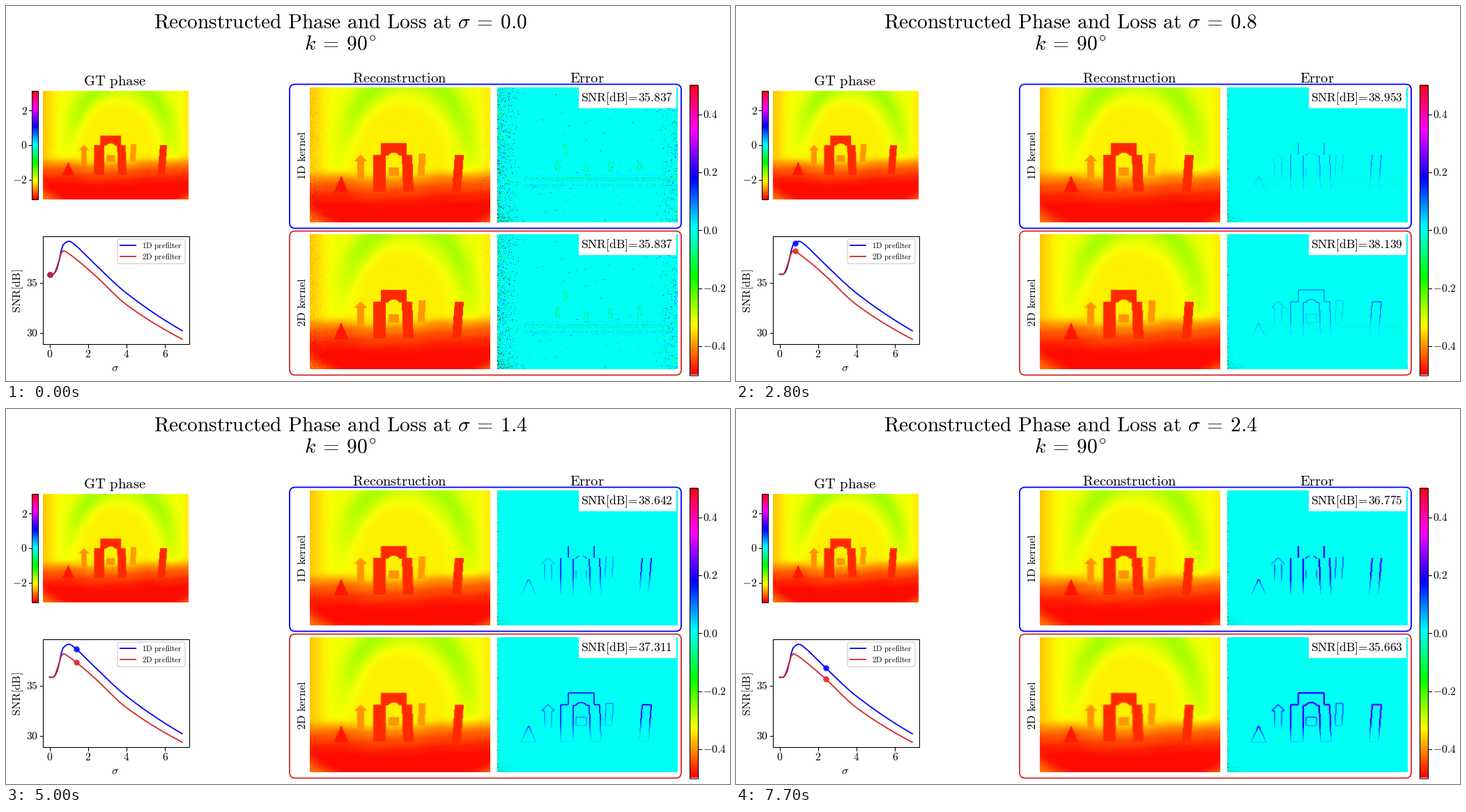
Recreate the animation shown at these times as a matplotlib script. Size 1039 px wide and 539 px high, loop 8000 ms.

```python
import numpy as np
import matplotlib.pyplot as plt
from matplotlib.animation import FuncAnimation
from matplotlib.patches import FancyBboxPatch, Rectangle

plt.rcParams["mathtext.fontset"] = "cm"
PT = 0.72  # points per pixel at 100 dpi

fig = plt.figure(figsize=(10.39, 5.39), dpi=100, facecolor="white")
ax = fig.add_axes([0, 0, 1, 1])
ax.set_xlim(0, 1039)
ax.set_ylim(539, 0)
ax.axis("off")


# ---------- drawing helpers, all in stage pixels ----------
def rm(words):
    return r"\mathrm{%s}" % words.replace(" ", r"\hspace{0.38}")


EQUALS = r"\hspace{0.22}=\hspace{0.22}"


def label(x, y, tex, size, ha="center", **kw):
    return ax.text(x, y, f"${tex}$", fontsize=size * PT, ha=ha, va="baseline",
                   rotation_mode="anchor", **kw)


def image(data, x, y, w, h, **kw):
    return ax.imshow(data, extent=(x, x + w, y + h, y), cmap="hsv",
                     aspect="auto", **kw)


def outline(x, y, w, h):
    ax.add_patch(Rectangle((x, y), w, h, fill=False, ec="black",
                           lw=1.1 * PT, zorder=4))


def rounded(x, y, w, h, radius, **kw):
    style = f"round,pad=0,rounding_size={radius}"
    return ax.add_patch(FancyBboxPatch((x, y), w, h, boxstyle=style, **kw))


def tick(x0, y0, x1, y1):
    ax.plot([x0, x1], [y0, y1], color="black", lw=1.1 * PT)


# ---------- phase scene, as a hue fraction between 0 and 1 ----------
H, W = 194, 259
Y, X = np.mgrid[:H, :W] + 0.5
u, v = X / W, Y / H


def ramp(x, a, b):
    s = np.clip((x - a) / (b - a), 0, 1)
    return s * s * (3 - 2 * s)


def bump(d):
    return np.exp(-d ** 2)


def blur(a, sigma, axis):
    k = np.arange(-4, 5)
    weights = np.exp(-0.5 * (k / sigma) ** 2)
    weights /= weights.sum()
    n = a.shape[axis]
    return sum(wt * a.take(np.clip(np.arange(n) + s, 0, n - 1), axis=axis)
               for s, wt in zip(k, weights))


def blur2(a, sigma):
    return blur(blur(a, sigma, 0), sigma, 1)


def slab(cx, top, width, height, lean=0):
    drop = (Y - top) / height
    return (np.abs(X - cx - lean * drop) < width / 2) & (0 < drop) & (drop < 1)


def wedge(cx, top, height, spread):
    drop = Y - top
    return (np.abs(X - cx) < spread * drop) & (drop < height)


bowl = np.hypot((u - 0.53) / 0.5, (v - 0.75) / 0.3)
corners = ramp(bowl, 1.03, 1.35) * ramp(v, 0.7, 0.85)


def make_scene():
    dome = np.hypot((u - 0.47) * 1.33, v - 0.5)
    arc = np.hypot((u - 0.54) / 0.35, (v - 0.62) / 0.72)
    wall = 0.161 + 0.018 * ramp(dome, 0.3, 0.5)
    wall += 0.05 * bump((arc - 1) / 0.17) * ramp(v, 0.78, 0.05)
    wall -= 0.05 * ramp(u, 0.15, -0.03) + 0.02 * ramp(u, 0.92, 1)

    horizon = 0.61 + 0.035 * bump((u - 0.42) / 0.22) + 0.005 * np.sin(24 * u)
    depth = v - horizon
    floor = 0.010 + 0.12 * np.clip(1 - depth / 0.26, 0, 1) ** 1.5
    floor += 0.003 * np.sin(75 * v + 9 * u) * ramp(v, 1, 0.7)
    near = ramp(depth, -0.05, 0.07)
    scene = wall * (1 - near) + floor * near + 0.07 * corners

    backdrop = scene.copy()

    def paint(hue, mask):
        scene[mask] = np.minimum(hue, backdrop[mask])

    paint(0.100, wedge(73, 96, 10, 0.95) | slab(73, 105, 11, 27))
    paint(0.105, slab(161, 95, 10, 32, -1))
    paint(0.100, slab(120.5, 115, 15, 12))
    paint(0.030, slab(120.5, 80, 37, 18))
    opening = np.hypot(X - 120.5, Y - 102) < 8.5
    scene[opening] = backdrop[opening]
    paint(0.030, slab(99.5, 97, 18, 53, 1))
    paint(0.030, slab(139.5, 97, 15, 53, 2))
    paint(0.028, slab(214.5, 97, 13, 53, -4))
    paint(0.018, wedge(45, 127, 24, 0.45))
    return blur2(scene, 0.45)


scene = make_scene()

# ---------- measurement noise ----------
rng = np.random.default_rng(3)
density = (0.3 * ramp(u, 0.14, 0) + 0.15 * ramp(u, 0.86, 1) + 0.5 * corners
           + 0.3 * bump(u / 0.015) + 0.005)
speckle = 0.1 * rng.standard_normal((H, W)) * (rng.random((H, W)) < density)
residue = 0.6 * speckle * np.maximum(bump(u / 0.01), 0.7 * corners)

patches = np.zeros((H, W), bool)
for x, y in [(98, 81), (87, 105), (128, 112), (163, 106), (205, 103)]:
    patches |= slab(x, y, 8, 16)
streaks = (v > 0.64) & (v < 0.76) & (u > 0.15)
texture = (0.05 * rng.standard_normal((H, W)) - 0.03) * patches
texture += 0.03 * rng.standard_normal((H, 1)) * streaks
texture *= rng.random((H, W)) < 0.5


def reconstruct(sigma, two_d):
    spread = 0.5 * np.sqrt(sigma + 0.05)
    smooth = blur2(scene, spread) if two_d else blur(scene, spread, 1)
    noisy = np.exp(-(max(sigma - 0.2, 0) / 0.35) ** 1.5)
    noise = noisy * speckle + (1 - noisy) * residue
    error = 1.3 * 2 * np.pi * np.abs(smooth - scene)
    error += noise + np.sqrt(noisy) * texture
    return np.clip(smooth + 0.15 * noise, 0, 1), np.clip(error, -0.5, 0.5)


# ---------- SNR curves through a few key points ----------
sigmas = np.arange(70) / 10
knots = np.array([0.2, 0.4, 0.7, 1, 1.4, 1.8, 2.4, 4, 6.9])
snr_1d = [35.837, 36.474, 38.760, 39.135, 38.642, 37.905, 36.775, 33.95, 30.2]
snr_2d = [35.837, 36.690, 38.191, 37.890, 37.311, 36.681, 35.663, 32.8, 29.35]


def monotone_curve(values):
    """Cubic through the knots whose only peaks are knots."""
    values = np.array(values)
    gaps = np.diff(knots)
    rate = np.diff(values) / gaps
    a, b = rate[:-1], rate[1:]
    inner = np.where(a * b > 0, 2 * a * b / (a + b), 0)
    slope = np.concatenate([[0], inner, [0.85 * rate[-1]]])
    x = np.maximum(sigmas, knots[0])
    i = np.clip(np.searchsorted(knots, x, "right") - 1, 0, len(gaps) - 1)
    gap = gaps[i]
    s = (x - knots[i]) / gap
    return (values[i] * (1 + 2 * s) * (1 - s) ** 2
            + values[i + 1] * s * s * (3 - 2 * s)
            + gap * slope[i] * s * (1 - s) ** 2
            + gap * slope[i + 1] * s * s * (s - 1))


def sx(s):
    return 62.5 + 27.6 * np.asarray(s)


def sy(db):
    return 486 - 14.39 * (np.asarray(db) - 28.86)


# ---------- static parts ----------
title = label(479.5, 31, "", 29.3)
label(479.5, 64, "k" + EQUALS + r"90^{\!\circ}", 29.7)
label(156, 114, rm("GT phase"), 20.6)
label(565, 110, rm("Reconstruction"), 20.4)
label(833.5, 110, rm("Error"), 20.4)

hues = np.linspace(1, 0, 256)[:, None]
image(scene, 53, 122, 208.5, 156, vmin=0, vmax=1)
image(hues, 37, 122, 8.5, 156)
outline(37, 122, 8.5, 156)
for value in (2, 0, -2):
    y = 200 - 24.83 * value
    tick(32.5, y, 37, y)
    label(30.5, y + 5.3, "{%d}" % value, 15.7, "right")

image(hues, 981, 114, 12, 416.5)
outline(981, 114, 12, 416.5)
for value in (0.4, 0.2, 0.0, -0.2, -0.4):
    y = 322.3 - 416.5 * value
    tick(993, y, 997.5, y)
    label(1000, y + 5.3, "{%.1f}" % value, 15.7, "left")

outline(53, 331, 209.5, 155)
for value in (0, 2, 4, 6):
    tick(sx(value), 486, sx(value), 490.5)
    label(sx(value), 505, str(value), 15.7)
for value in (30, 35):
    tick(48.5, sy(value), 53, sy(value))
    label(46, sy(value) + 5.3, str(value), 15.7, "right")
label(157, 525, r"\sigma", 16.5)
label(21, 409.5, rm("SNR[dB]"), 16.3, rotation=90)
rounded(160, 335, 97, 35.5, 3, fc="white", ec="0.8", lw=1.1 * PT, zorder=5)


class Kernel:
    """Everything that belongs to one row: images, frame, curve, legend."""

    def __init__(self, name, top, color, values, best, legend_y):
        self.color, self.best = color, best
        self.snr = monotone_curve(values)
        self.two_d = name == "2D"
        blank = np.zeros((H, W))
        self.phase = image(blank, 436, top, W, H, vmin=0, vmax=1)
        self.error = image(blank, 705, top, W, H, vmin=-0.5, vmax=0.5)
        self.box = rounded(407, top - 4.5, 562, 207, 8, fill=False, zorder=4)
        ax.add_patch(Rectangle((822, top), 140, 30, fc="white", zorder=5))
        self.readout = label(825, top + 20, "", 17.5, "left", zorder=6)
        label(429.5, top + 97.5, rm(f"{name} kernel"), 16.3, rotation=90)
        self.curve, = ax.plot(sx(sigmas), sy(self.snr), zorder=3,
                              solid_capstyle="projecting")
        self.key, = ax.plot([163, 187], [legend_y] * 2, zorder=6,
                            solid_capstyle="butt")
        label(195, legend_y + 4, rm(f"{name} prefilter"), 11.1, "left", zorder=6)
        self.dot, = ax.plot([], [], "o", mew=0, zorder=3.5)
        self.cache = {}

    def show(self, step):
        if step not in self.cache:
            self.cache[step] = reconstruct(step / 10, self.two_d)
        phase, error = self.cache[step]
        self.phase.set_data(phase)
        self.error.set_data(error)

        hot = step == self.best
        color = "limegreen" if hot else self.color
        width = (4.6 if hot else 1.8) * PT
        for line in (self.curve, self.key):
            line.set(color=color, linewidth=width)
        self.box.set(edgecolor=color, linewidth=width)
        self.dot.set(color=color, alpha=1 if hot else 0.85,
                     markersize=(11 if hot else 8.6) * PT)
        self.dot.set_data([sx(step / 10)], [sy(self.snr[step])])
        self.readout.set(color="green" if hot else "black",
                         text=r"$%s\!=\!%.3f$" % (rm("SNR[dB]"), self.snr[step]))


kernels = [Kernel("1D", 117, "blue", snr_1d, 10, 344),
           Kernel("2D", 328, "tab:red", snr_2d, 7, 359.5)]

# Tenths of sigma per 100 ms tick; the two optima are held longer.
best_steps = [kernel.best for kernel in kernels]
timeline = [step for step in range(25) if step != 15
            for _ in range(7 if step in best_steps else 3)]


def update(frame):
    step = timeline[frame]
    words = rm("Reconstructed Phase and Loss at ")
    title.set_text(f"${words}\\sigma{EQUALS}{step / 10:.1f}$")
    for kernel in kernels:
        kernel.show(step)
    return []


anim = FuncAnimation(fig, update, frames=len(timeline), interval=100,
                     repeat=True, repeat_delay=0, blit=False)
plt.show()
```
